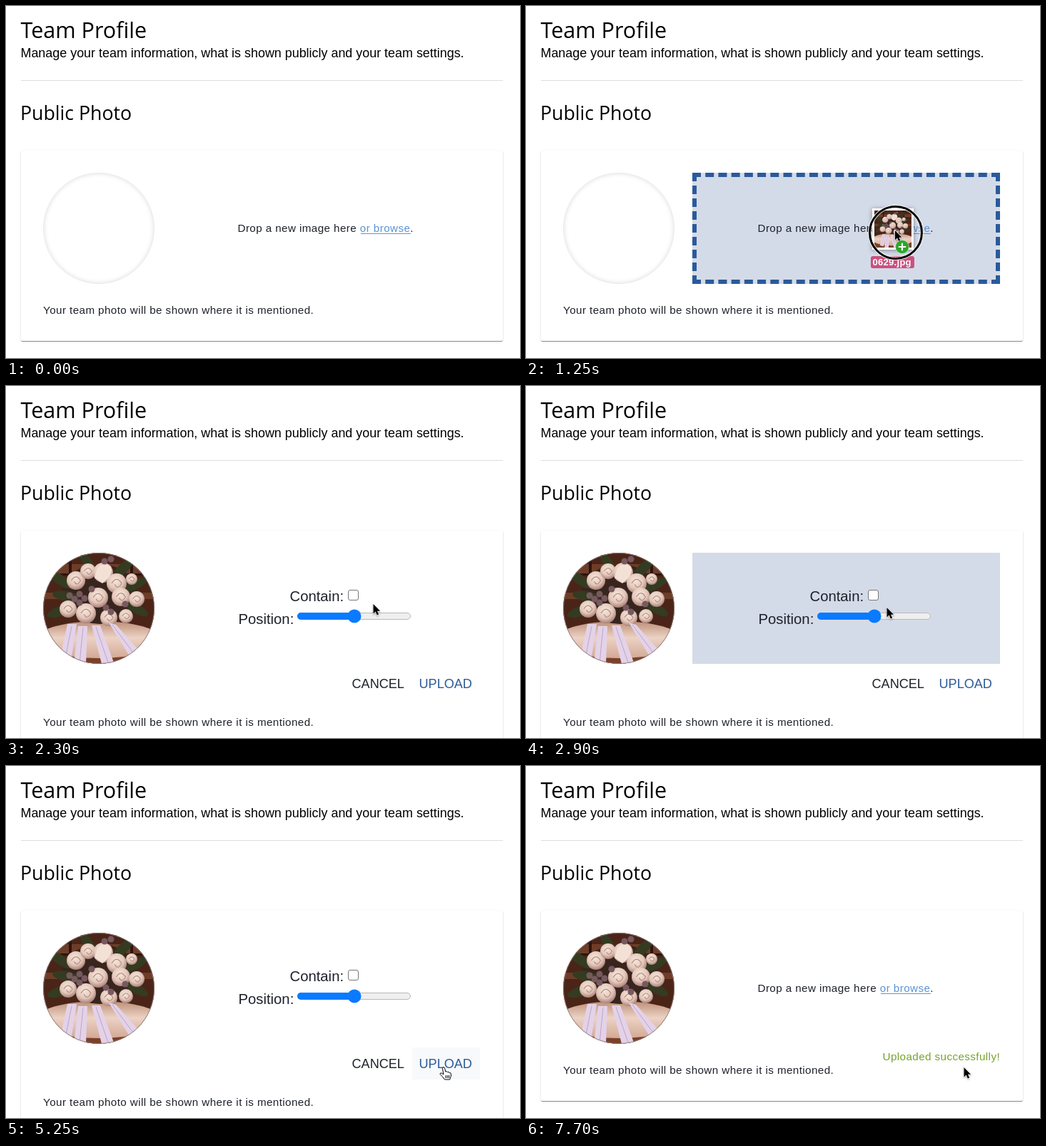
Write an HTML page that moves like this. It is 720 by 494 pixels and loops after 8.2 s.

```html
<!DOCTYPE html>
<html lang="en">
<head>
<meta charset="utf-8">
<title>Team Profile</title>
<style>
html, body { margin: 0; width: 100%; height: 100%; overflow: hidden; background: #fff; }
#stage { position: relative; width: 720px; height: 494px; overflow: hidden; }
#stage > * { position: absolute; box-sizing: border-box; }
#card {
  left: 21px; top: 203px; width: 675px; border-radius: 2px; background: #fff;
  box-shadow: 0 2px 1px -1px rgba(0,0,0,.25), 0 1px 1px rgba(0,0,0,.2), 0 1px 3px rgba(0,0,0,.14);
}
#ring {
  left: 52px; top: 234px; width: 156px; height: 156px; border-radius: 50%;
  border: 1px solid #e9e9e9; box-shadow: inset 0 0 6px rgba(0,0,0,.13);
}
#zone { left: 233px; top: 234px; width: 431px; height: 156px; border: 6px dashed transparent; }
svg { left: 0; top: 0; }
text { font: 15.2px "Liberation Sans", Arial, sans-serif; letter-spacing: .42px; fill: #1e222a; white-space: pre; }
text.head { font-family: "Open Sans", "Noto Sans", sans-serif; letter-spacing: 0; fill: #000; }
text.lead { font-size: 17.92px; letter-spacing: 0; fill: #000; }
text.form { font-size: 20.3px; letter-spacing: 0; }
text.button { font-size: 18.1px; letter-spacing: 0; }
text.file { font-size: 13px; font-weight: bold; letter-spacing: .3px; fill: #fff; }
</style>
</head>
<body>
<div id="stage">
  <div id="card"></div>
  <div id="ring"></div>
  <div id="zone"></div>
  <svg width="720" height="494" viewBox="0 0 720 494">
    <defs>
      <clipPath id="round"><circle cx="78" cy="78" r="78"/></clipPath>
      <clipPath id="square"><path d="M0 0h156v156H0z"/></clipPath>
      <linearGradient id="seat" x2="0" y2="1">
        <stop offset="0" stop-color="#bd8f78"/><stop offset=".45" stop-color="#ecd2c4"/><stop offset="1" stop-color="#d3a995"/>
      </linearGradient>
      <radialGradient id="rose" cx=".45" cy=".35" r=".65">
        <stop offset="0" stop-color="#f6e6dc"/><stop offset=".6" stop-color="#e4c8bb"/><stop offset="1" stop-color="#a98078"/>
      </radialGradient>
      <g id="photo">
        <path fill="#4b2418" d="M0 0h156v156H0z"/>
        <path fill="#6e3d27" d="M0 16h156v13H0zM0 56h156v9H0z"/>
        <path fill="#2c1410" d="M0 29h156v3H0zM36 0h4v90h-4zM122 0h4v90h-4z"/>
        <path fill="#7a4029" d="M0 118h156v38H0z"/>
        <ellipse cx="78" cy="122" rx="88" ry="26" fill="url(#seat)"/>
        <g id="bouquet"></g>
        <path fill="#e3d2e8" d="M34 100h13l-8 51-15-4zM49 103h13l-2 53H43zM68 102h12l19 52-17 2zM92 98l10 3 34 38-12 11z"/>
        <path fill="none" stroke="#bda5c4" d="M40 103l-9 45M56 105l-5 50M74 104l17 50M97 101l32 43"/>
      </g>
    </defs>

    <text class="head" x="20.5" y="45" font-size="30.5" style="font-size:30.5px">Team Profile</text>
    <text class="lead" x="20.5" y="72">Manage your team information, what is shown publicly and your team settings.</text>
    <path d="M21 104.5H696" stroke="#ddd"/>
    <text class="head" x="20" y="160" style="font-size:26.7px">Public Photo</text>

    <g id="avatar" transform="translate(52 234)">
      <use href="#photo" clip-path="url(#round)"/>
      <circle cx="78" cy="78" r="77.5" fill="none" stroke="#8f8583" stroke-opacity=".8"/>
    </g>

    <g id="prompt">
      <text x="324.5" y="317">Drop a new image here <tspan fill="#5b93d6">or browse</tspan>.</text>
      <path d="M497 319.5h70" stroke="#5b93d6"/>
    </g>

    <g id="form">
      <text class="form" x="397.5" y="302">Contain:</text>
      <rect x="479.5" y="286.5" width="14" height="14" rx="2.5" fill="#fff" stroke="#767676"/>
      <text class="form" x="325.5" y="334">Position:</text>
      <rect x="408.5" y="318.5" width="158" height="9" rx="4.5" fill="#efefef" stroke="#b8b8b8"/>
      <rect x="408" y="318" width="84" height="10" rx="5" fill="#0a7aff"/>
      <circle cx="488" cy="323" r="9.5" fill="#0a7aff"/>
      <rect id="hover" x="569" y="395" width="95" height="45" fill="#f7f9fb"/>
      <text class="button" x="484.5" y="424">CANCEL</text>
      <text class="button" x="578.5" y="424" style="fill:#2d5c9a">UPLOAD</text>
    </g>

    <text id="caption" x="52">Your team photo will be shown where it is mentioned.</text>
    <text id="success" x="499.5" y="413" style="fill:#76a32d">Uploaded successfully!</text>

    <g id="pointer">
      <g id="drag">
        <rect x="-32" y="-31" width="58" height="58" fill="#fff" style="filter:drop-shadow(0 1px 3px rgba(0,0,0,.4))"/>
        <g transform="translate(-29 -28) scale(.333)"><use href="#photo" clip-path="url(#square)"/></g>
        <rect x="-34" y="36" width="61" height="17" rx="3" fill="#c9517f"/>
        <text class="file" x="-31.5" y="49">0629.jpg</text>
      </g>
      <g id="press" fill="none">
        <circle r="36.5" stroke="#fff" stroke-width="5" stroke-opacity=".8"/>
        <circle r="36.5" stroke="#000" stroke-width="3"/>
      </g>
      <path id="arrow" d="M0 0V13.4L3.1 10.6L5.3 15.6L7.6 14.6L5.5 9.8H9.6Z" fill="#000" stroke="#fff" stroke-width="1.2" paint-order="stroke" style="filter:drop-shadow(0 1px 1px rgba(0,0,0,.35))"/>
      <path id="hand" d="M-2 1.5Q-2-.2-.5-.2T1.2 1.5L2.2 6Q4 5 5 6.6Q6.700 5.800 7.600 7.400Q9.500 7 9.800 9L9.800 12L8.200 17H1L-2.500 12.500L-5.500 9.500Q-5.500 7.300-3.300 8L-.6 10Z M2.600 11v4M4.800 11v4M7 11v4" fill="#fff" stroke="#000" stroke-linejoin="round"/>
      <g id="plus">
        <circle cx="10" cy="23" r="9.500" fill="#2fa52b" stroke="#fff" stroke-opacity=".5"/>
        <path d="M4.800 23h10.400M10 17.800v10.400" stroke="#fff" stroke-width="2.200"/>
      </g>
    </g>
  </svg>
</div>
<script>
const LOOP = 8200, STEP = 50;
const el = id => document.getElementById(id);
const show = (id, on) => el(id).style.display = on ? "" : "none";
const ramp = (t, from, to) => Math.min(1, Math.max(0, (t - from) / (to - from)));

// Bouquet: leaves, berries and flowers, back to front
const dot = (x, y, r, fill) => `<circle cx="${x}" cy="${y}" r="${r}" fill="${fill}"/>`;
const leaf = (x, y, turn) =>
  `<ellipse rx="19" ry="7" fill="#343b20" transform="translate(${x} ${y}) rotate(${turn})"/>`;
const rose = ([x, y, r]) => dot(x, y, r, "url(#rose)") +
  `<path d="M${x - r * .5} ${y}q${r * .5} ${-r * .8} ${r} 0q${-r * .4} ${r * .7} ${-r * .7} ${r * .1}" fill="none" stroke="#b78f82" stroke-width="1.2"/>`;
const leaves = [[24, 38, 35], [32, 61, 10], [112, 22, -45], [128, 45, -25], [24, 82, -20], [130, 78, 30], [63, 16, 60]];
const berries = [[37, 60], [44, 65], [51, 58], [58, 64], [51, 70], [68, 51], [88, 77], [95, 83], [86, 12], [95, 9], [115, 72]];
const flowers = [[46, 39, 13], [63, 26, 11], [84, 28, 14], [103, 43, 14], [77, 63, 14], [109, 62, 13],
  [124, 37, 8], [131, 65, 11], [35, 79, 12], [60, 85, 14], [92, 91, 12], [116, 89, 10]];
el("bouquet").innerHTML =
  `<ellipse cx="79" cy="58" rx="53" ry="42" fill="#38251d"/>` +
  leaves.map(l => leaf(...l)).join("") +
  flowers.map(rose).join("") +
  `<path d="M72 35Q77 10 94 19Q101 30 83 43Z" fill="#f4e1d6"/>` +
  berries.map(([x, y]) => dot(x, y, 4.5, "#77595f")).join("");

// Pointer path: time, x, y
const path = [
  [400, 643, 454], [600, 643, 454], [700, 575, 395], [800, 535, 358], [1000, 521, 330],
  [1400, 514.5, 306], [2600, 514.5, 306], [2900, 505.5, 311], [3450, 510, 322], [3750, 530, 355],
  [3950, 562.5, 395], [4100, 603, 418], [4450, 603, 418], [4850, 613.5, 423], [LOOP, 613.5, 423]
];
function pointerAt(t) {
  const i = Math.max(1, path.findIndex(p => p[0] >= t));
  const [a, b] = [path[i - 1], path[i]];
  const k = ramp(t, a[0], b[0]);
  return [a[1] + (b[1] - a[1]) * k, a[2] + (b[2] - a[2]) * k];
}

function draw(now) {
  const t = Math.floor(now % LOOP / STEP) * STEP;
  const within = (from, to) => t >= from && t < to;
  const dragging = within(400, 1450), over = within(700, 1450);
  const editing = within(2000, 6650), hand = within(3950, 6700);

  el("card").style.height = (editing ? 312 : 267) + "px";
  el("caption").setAttribute("y", editing ? 477 : 432);
  show("form", editing);
  show("prompt", !editing);
  show("avatar", t >= 2200);
  show("ring", t < 2200);

  const fill = over ? 1 : ramp(t, 2600, 2750) * (1 - ramp(t, 3950, 4150));
  el("zone").style.background = `rgba(212,219,232,${fill})`;
  el("zone").style.borderColor = over ? "#2a5a9b" : "transparent";
  el("hover").style.opacity = ramp(t, 4000, 4150);
  el("success").style.opacity = ramp(t, 6600, 6950);

  show("pointer", t >= 400);
  el("pointer").setAttribute("transform", `translate(${pointerAt(t)})`);
  show("drag", dragging);
  show("plus", over);
  show("hand", hand);
  show("arrow", !hand);

  const clicking = within(5250, 5700);
  show("press", dragging || clicking);
  const size = clicking ? ramp(t, 5250, 5400) : 1;
  el("press").setAttribute("transform", `translate(1 ${clicking ? -5 : 3}) scale(${size})`);
  el("press").style.opacity = clicking ? 1 - ramp(t, 5450, 5700) : 1;
}

function tick() {
  draw(performance.now());
  requestAnimationFrame(tick);
}
tick();
</script>
</body>
</html>
```
